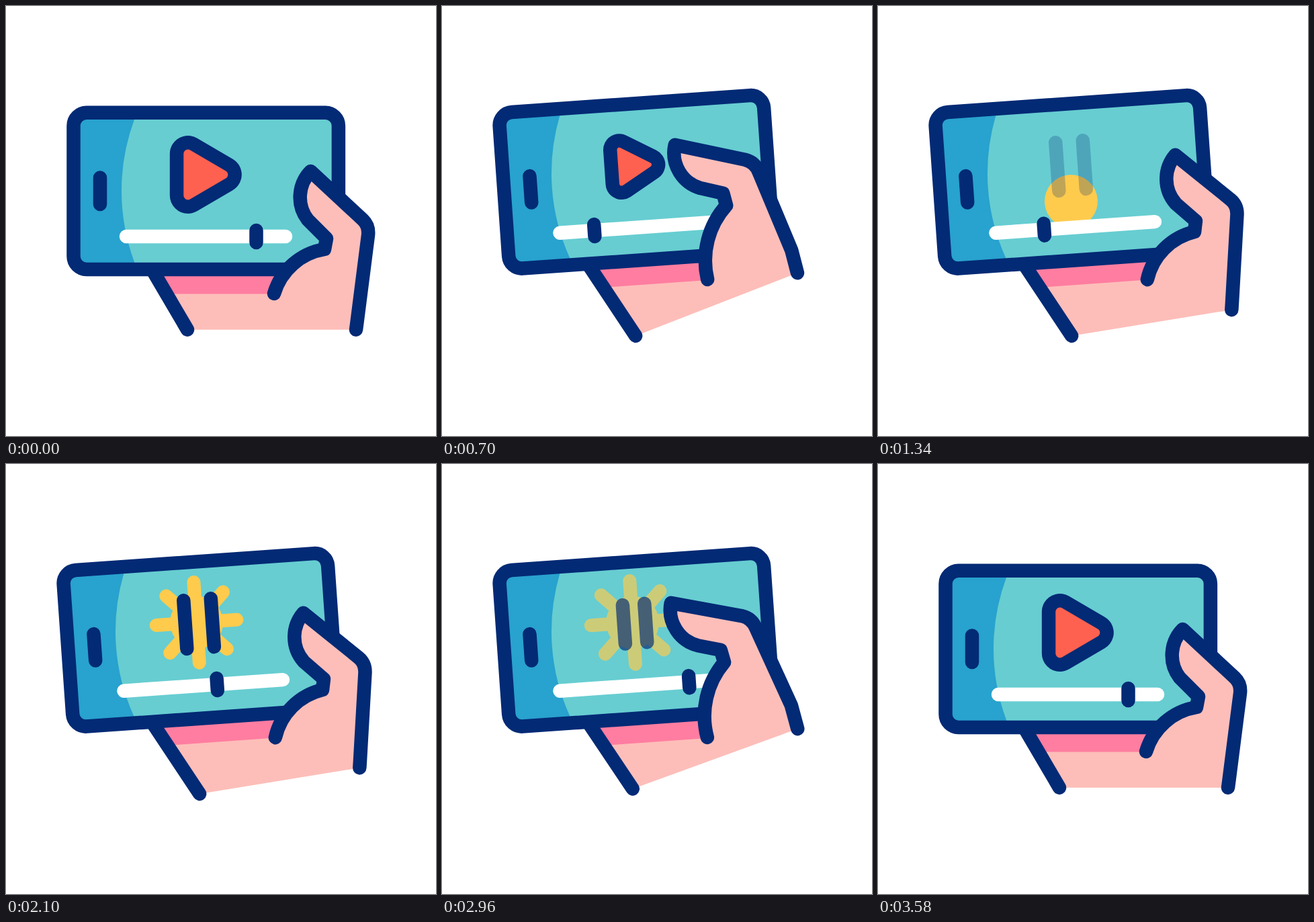
Recreate the animation shown at these times as an HTML page. Size 640 by 640 pixels, loop 3600 ms.

```html
<!DOCTYPE html>
<html lang="en">
<head>
<meta charset="utf-8">
<title>Watching a video</title>
<style>
  html, body { margin: 0; width: 100%; height: 100%; overflow: hidden; background: #fff; }
  svg { display: block; width: 100%; height: 100%; }
  .line { fill: none; stroke: #032a75; stroke-width: 20.5; stroke-linecap: round; stroke-linejoin: round; }
</style>
</head>
<body>
<svg viewBox="0 0 640 640">
  <defs>
    <clipPath id="sky"><rect x="110" y="168" width="376" height="175"/></clipPath>
  </defs>
  <g id="scene">
    <path id="palm" fill="#fdbeb9"/>
    <path id="shade" fill="#ff7da0"/>
    <path id="arm" class="line"/>

    <rect x="100.5" y="158.7" width="394.4" height="233.2" rx="19.5" fill="#67cdd1"/>
    <path d="M120 159H191V169A305 305 0 0 0 191 381V391H120Q101 391 101 372V178Q101 159 120 159Z" fill="#28a2ce"/>
    <rect class="line" x="100.5" y="158.7" width="394.4" height="233.2" rx="19.5"/>
    <path class="line" d="M140 255.5V295"/>

    <g clip-path="url(#sky)">
      <g id="sun">
        <circle r="39.5" fill="#fecb4d"/>
        <path id="rays" class="line" style="stroke:#fecb4d;stroke-width:20"/>
      </g>
    </g>
    <path id="pause" class="line" d="M-20.3-36V36M20.3-36V36"/>
    <g id="play" stroke-linejoin="round">
      <path id="rim" d="M-26.5-31V31L26.5 0Z" fill="#032a75" stroke="#032a75"/>
      <path id="core" d="M-26.5-31V31L26.5 0Z" fill="#ff6150" stroke="#ff6150"/>
    </g>
    <path class="line" d="M179 343H416" style="stroke:#fff"/>
    <path id="knob" class="line" d="M0 334V352"/>

    <path id="hand" class="line" style="fill:#fdbeb9"/>
  </g>
</svg>
<script>
const LOOP = 3600, LINE = 20.5, TAU = 2 * Math.PI;
const el = Object.fromEntries([...document.querySelectorAll('[id]')].map(e => [e.id, e]));
const set = (id, attrs) => { for (const k in attrs) el[id].setAttribute(k, attrs[k]); };

const lerp = (a, b, k) => a + (b - a) * k;
const clamp = v => Math.min(1, Math.max(0, v));
const linear = v => v;
const smooth = v => v * v * (3 - 2 * v);
const ramp = (t, a, b, ease = smooth) => ease(clamp((t - a) / (b - a)));
// Rises from a to b, falls from c to d
const swell = (t, a, b, c, d, ease) => ramp(t, a, b, ease) - ramp(t, c, d, ease);

// Key points of the hand: [resting, pressing]
const PIVOT = [520, 560];
const joints = {
  root:    [[399, 428],   [393, 427.4]],
  web:     [[474, 362],   [426, 317.5]],
  notch:   [[477, 346],   [422, 299]],
  pad:     [[449, 318],   [388.5, 290]],
  tip:     [[453.5, 246], [353, 224]],
  knuckle: [[531, 318],   [456.5, 250.5]],
  bend:    [[540.5, 327], [471.5, 255]],
  side:    [[539, 341],   [476.5, 270]],
  wrist:   [[522.3, 472], [521, 388.5]],
  cuff:    [[521, 481.7], [528, 424]],
};

// Each joint swings around a point below the wrist
function swing([from, to], k) {
  const [a, b] = [from, to].map(([x, y]) => [x - PIVOT[0], y - PIVOT[1]]);
  const r = lerp(Math.hypot(...a), Math.hypot(...b), k);
  const turn = lerp(Math.atan2(a[1], a[0]), Math.atan2(b[1], b[0]), k);
  return [PIVOT[0] + r * Math.cos(turn), PIVOT[1] + r * Math.sin(turn)];
}

function drawHand(press, reach) {
  const j = {};
  for (const name in joints) j[name] = swing(joints[name], press);
  const r = lerp(94, 124, press);
  set('hand', { d: `M${j.root}A${r} ${r} 0 0 1 ${j.web}L${j.notch}L${j.pad}A55 55 0 0 1 ${j.tip}` +
    `L${j.knuckle}Q${j.bend} ${j.side}L${j.wrist}L${j.cuff}` });

  const elbow = [270 + 10.7 * reach, 481.7 + 22 * reach];
  set('arm', { d: `M215 388L${elbow}` });
  set('palm', { d: `M215 388L${elbow}L${j.cuff}L450 395Z` });
  set('shade', { d: `M216 391L238 428.5H${j.root[0]}V391Z` });
}

function drawIcons(t, press) {
  // Icons shrink under the thumb while their lines keep their weight
  const s = 1 - 0.2 * clamp((press - 0.1) / 0.9);
  const transform = `translate(297.3 251) scale(${s})`;
  set('play', { transform, opacity: 1 - swell(t, 890, 1080, 3200, 3370, linear) });
  set('rim', { 'stroke-width': 33.5 + LINE / s });
  set('core', { 'stroke-width': 33.5 - LINE / s });
  set('pause', { transform, opacity: swell(t, 1300, 1470, 2900, 3085, linear) });
  el.pause.style.strokeWidth = LINE / s;
}

function drawSun(t) {
  const pulse = 61 - Math.cos((t - 2100) / 573 * TAU);
  const r = lerp(28, pulse, ramp(t, 1480, 1760));
  let d = '';
  for (let a = 0; a < TAU - 0.1; a += TAU / 8) d += `M0 0L${r * Math.cos(a)} ${r * Math.sin(a)}`;
  set('rays', { d });
  set('sun', {
    transform: `translate(294 ${lerp(388, 249, ramp(t, 1130, 1500))})`,
    opacity: 1 - ramp(t, 2900, 3085, linear),
  });
}

function draw(t) {
  const press = swell(t, 342, 760, 820, 1300) + swell(t, 2420, 2880, 2970, 3450);
  set('scene', { transform: `rotate(${-4 * swell(t, 0, 405, 3040, 3570)} 101 391)` });
  set('knob', { transform: `translate(${lerp(372.5, 228, swell(t, 0, 760, 760, 3060))} 0)` });
  drawHand(press, swell(t, 0, 405, 2720, 3320));
  drawIcons(t, press);
  drawSun(t);
}

const start = performance.now();
function tick() {
  draw((performance.now() - start) % LOOP);
  requestAnimationFrame(tick);
}
tick();
</script>
</body>
</html>
```
